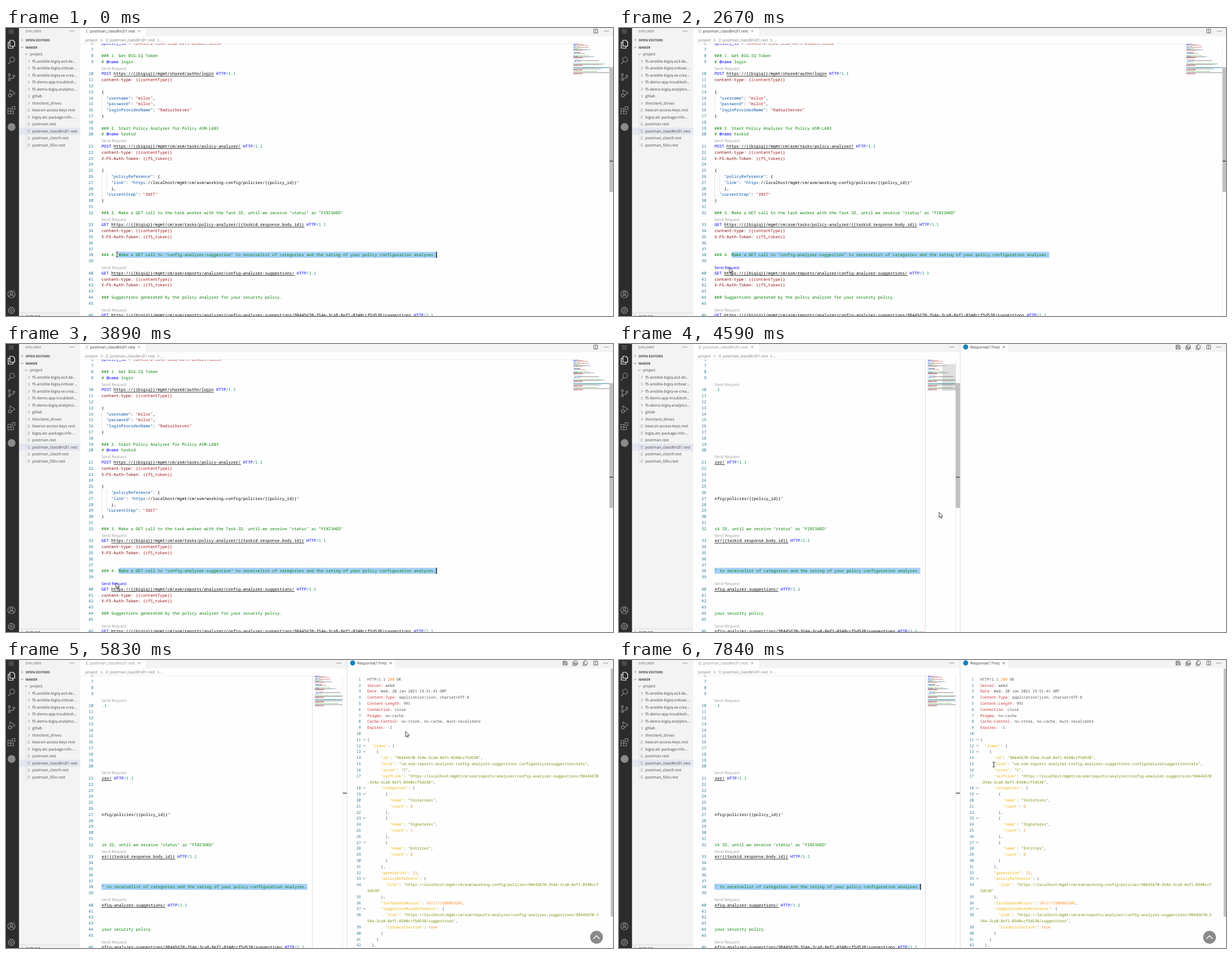
Write an HTML page that moves like this. It is 1087x515 px and loops after 8 s.

```html
<!DOCTYPE html>
<html lang="en">
<head>
<meta charset="utf-8">
<title>REST editor</title>
<style>
  html, body { margin: 0; width: 100%; height: 100%; overflow: hidden; background: #fefefe; }
  svg { display: block; width: 1087px; height: 515px; }
  text { white-space: pre; text-rendering: geometricPrecision; }
  .ui { font-family: "Open Sans", "Noto Sans", sans-serif; font-size: 6.87px; }
  .mono { font-family: "Noto Sans Mono", "DejaVu Sans Mono", monospace; font-size: 7.294px; }
  .small { font-size: 6.78px; }
</style>
</head>
<body>
<svg id="stage" viewBox="0 0 1087 515"></svg>
<script>
const LOOP = 8000, SPLIT = 3950, RESPONSE = 5830;
const LEFT = 171, TOP = 27.7, ROW = 10.8, ADV = 4.376, SCROLL = 231;
const RESP_ADV = 4.068, WRAP = 102;
const INK = '#000', BLUE = '#0000ff', GREEN = '#008000', RED = '#a31515', MAROON = '#800000', KEY = '#0451a5', NUM = '#098658';
const ID = '98445670-354e-3ca8-8ef1-0340ccf5d538';
const REPORTS = '/mgmt/cm/asm/reports/analyzer/config-analyzer-suggestions/';
const HEADERS = 'content-type: {{contentType}}\nX-F5-Auth-Token: {{f5_token}}';

const code = `@bigiq = 10.1.1.4
@contentType = application/json
@f5_token = {{login.response.body.token.token}}

# Policy to analyze
@policy_id = ${ID}

### 1. Get BIG-IQ Token
# @name login
POST https://{{bigiq}}/mgmt/shared/authn/login HTTP/1.1
content-type: {{contentType}}

{
  "username": "milor",
  "password": "milor",
  "loginProviderName": "RadiusServer"
}

### 2. Start Policy Analyzer for Policy ASM-LAB3
# @name taskid
POST https://{{bigiq}}/mgmt/cm/asm/tasks/policy-analyzer/ HTTP/1.1
${HEADERS}

{
    "policyReference": {
    "link": "https://localhost/mgmt/cm/asm/working-config/policies/{{policy_id}}"
    },
  "currentStep": "INIT"
}

### 3. Make a GET call to the task worker with the Task ID, until we receive "status" as "FINISHED"
GET https://{{bigiq}}/mgmt/cm/asm/tasks/policy-analyzer/{{taskid.response.body.id}} HTTP/1.1
${HEADERS}


### 4. Make a GET call to "config-analyzer-suggestion" to receivelist of categories and the rating of your policy configuration analyses.

GET https://{{bigiq}}${REPORTS} HTTP/1.1
${HEADERS}

### Suggestions generated by the policy analyzer for your security policy.

GET https://{{bigiq}}${REPORTS}${ID}/suggestions HTTP/1.1
${HEADERS}`.split('\n');

const category = (name, count, end) => `      {
          "name": "${name}",
          "count": ${count}
        }${end}`;
const response = `HTTP/1.1 200 OK
Server: webd
Date: Wed, 20 Jan 2021 19:51:41 GMT
Content-Type: application/json; charset=UTF-8
Content-Length: 991
Connection: close
Pragma: no-cache
Cache-Control: no-store, no-cache, must-revalidate
Expires: -1

{
  "items": [
    {
      "id": "${ID}",
      "kind": "cm:asm:reports:analyzer:config-analyzer-suggestions:configanalyzersuggestionstate",
      "score": "C",
      "selfLink": "https://localhost${REPORTS}${ID}",
      "categories": [
  ${category('Violations', 6, ',')}
  ${category('Signatures', 1, ',')}
  ${category('Entities', 8, '')}
      ],
      "generation": 13,
      "policyReference": {
        "link": "https://localhost/mgmt/cm/asm/working-config/policies/${ID}"
      },
      "lastUpdateMicros": 1611171508063201,
      "suggestionRuleReference": {
        "link": "https://localhost${REPORTS}${ID}/suggestions",
        "isSubcollection": true
      }
    }
  ],`.split('\n');

const esc = s => s.replace(/&/g, '&amp;').replace(/</g, '&lt;');
const rect = (x, y, w, h, fill, more = '') => `<rect x="${x}" y="${y}" width="${w}" height="${h}" fill="${fill}" ${more}/>`;
const path = (d, stroke, width = .8, more = '') => `<path d="${d}" fill="none" stroke="${stroke}" stroke-width="${width}" ${more}/>`;
const label = (x, cy, s, fill = '#444', more = '') => `<text class="ui" x="${x}" y="${cy + 2.4}" fill="${fill}" ${more}>${esc(s)}</text>`;
const mono = (x, cy, body, cls = '', more = '') => `<text class="mono ${cls}" x="${x}" y="${cy + 2.6}" ${more}>${body}</text>`;
const spans = tokens => tokens.map(([s, fill]) => `<tspan fill="${fill}">${esc(s)}</tspan>`).join('');
const chevron = (x, y, down, color = '#666') =>
  path(down ? `M${x - 2.4} ${y - 1.2}l2.4 2.4l2.4-2.4` : `M${x - 1.2} ${y - 2.4}l2.4 2.4l-2.4 2.4`, color);
const listIcon = (x, y) => path(`M${x - 2.5} ${y - 2}h5m-5 2h3.6m-3.6 2h5`, '#9a9a9a', .7);
const dots = (x, y) => [-3, 0, 3].map(d => `<circle cx="${x + d}" cy="${y}" r=".75" fill="#444"/>`).join('');
const cross = (x, y, color = '#444') => path(`M${x - 2} ${y - 2}l4 4m0-4l-4 4`, color);
const splitIcon = (x, y) => path(`M${x - 3.5} ${y - 3.5}h7v7h-7zm3.5 0v7`, '#444');
const group = (id, body, more = '') => `<g id="${id}" ${more}>${body}</g>`;

// Syntax colours: each token is [text, colour, underlined].
function codeTokens(line) {
  let m;
  if (line[0] === '#') return line.split(/(@name)/).map(s => [s, s === '@name' ? BLUE : GREEN]);
  if (m = line.match(/^(GET|POST) (\S+) HTTP(.*)$/))
    return [[m[1], BLUE], [' ', INK], [m[2], INK, true], [' HTTP', BLUE], [m[3], NUM]];
  if (m = line.match(/^(@\w+)( = )(.*)$/)) return [[m[1], BLUE], [m[2], INK], [m[3], RED]];
  if (m = line.match(/^([\w-]+:)(.*)$/)) return [[m[1], MAROON], [m[2], RED]];
  return line.split(/("\w+"(?=:)|https[^"]*|"\w*"?)/).filter(Boolean).map((s, i, all) => {
    const isKey = s[0] === '"' && (all[i + 1] || '')[0] === ':';
    const url = s.startsWith('https');
    return [s, isKey ? KEY : url || s[0] === '"' ? RED : INK, url];
  });
}

function responseTokens(line, i) {
  const text = '#4d4d4c', m = line.match(/^([\w-]+:)(.*)$/);
  if (i === 0) return line.split(/(200)/).map(s => [s, s === '200' ? '#f5871f' : text]);
  if (m) return [[m[1], '#c82829'], [m[2], text]];
  return line.split(/("\w+"(?=:)|https[^"]*|"[^"]*"|"|\b\d+\b|true)/).filter(Boolean).map((s, k, all) => {
    if (s.startsWith('https')) return [s, '#2f78c4'];
    if (s[0] === '"') return [s, (all[k + 1] || '')[0] === ':' ? '#eab000' : '#718c00'];
    return [s, /^(\d+|true)$/.test(s) ? '#f5871f' : text];
  });
}

function wrapTokens(tokens) {
  const rows = [[]];
  let col = 0;
  for (let [s, fill] of tokens) {
    while (col + s.length > WRAP) {
      const cut = WRAP - col;
      rows.at(-1).push([s.slice(0, cut), fill]);
      rows.push([]);
      s = s.slice(cut);
      col = 0;
    }
    rows.at(-1).push([s, fill]);
    col += s.length;
  }
  return rows;
}

function buildCode() {
  let numbers = '', lenses = '', body = '', row = 0;
  for (let n = 6; n <= 46; n++) {
    const line = code[n - 1];
    if (/^(GET|POST)/.test(line)) {
      const id = n === 40 ? 'id="send"' : '';
      lenses += label(LEFT, TOP + ROW * row++ + 1.4, 'Send Request', '#999', `${id} style="font-size:7px"`);
    }
    const cy = TOP + ROW * row++;
    numbers += mono(156.5, cy, n, '', 'fill="#237893" text-anchor="end"');
    const guides = n >= 14 && n <= 16 || n === 29 ? 1 : n >= 26 && n <= 28 ? 2 : 0;
    for (let g = 0; g < guides; g++) body += rect(LEFT + .3 + g * 2 * ADV, cy - ROW / 2, .6, ROW, '#d3d3d3');
    if (n === 38) {
      const x = LEFT + 7 * ADV, len = line.length - 7;
      body += rect(x, cy - 5.5, len * ADV, ROW, '#a8d1fb');
      body += mono(x, cy, line.slice(7).replace(/[^ ]/g, ' ').replace(/ /g, (c, i) => line[i + 7] === ' ' ? '·' : ' '), '', 'fill="#333" opacity=".3"');
      body += rect(770.2, cy - 5.5, 1.4, ROW, '#000', 'id="caret"');
    }
    const tokens = codeTokens(line);
    body += mono(LEFT, cy, spans(tokens));
    let col = 0;
    for (const [s, fill, under] of tokens) {
      if (under) body += rect(LEFT + col * ADV, cy + 4, s.length * ADV, .8, fill);
      col += s.length;
    }
  }
  return `<clipPath id="codeClip"><rect id="codeBox" x="${LEFT}" y="28" width="845" height="487"/></clipPath>
    <clipPath id="gutterClip"><rect x="133" y="28" width="500" height="487"/></clipPath>
    <g clip-path="url(#gutterClip)">${numbers}${lenses}</g>
    <g clip-path="url(#codeClip)">${group('code', body)}</g>`;
}

function minimap(x, width) {
  let out = '';
  code.forEach((line, i) => {
    const y = 28.3 + i * 1.137;
    if (i === 37) out += rect(x, y - .2, width, 1.3, '#7fb8f0');
    let col = 0;
    for (const [s, fill] of codeTokens(line)) {
      for (const m of s.matchAll(/\S+/g)) {
        const from = (col + m.index) * .568;
        const w = Math.min(m[0].length * .568, width - from);
        if (w > 0) out += rect(x + from, y, w, .75, fill, 'opacity=".6"');
      }
      col += s.length;
    }
  });
  return out;
}

function buildSidebar() {
  const names = ['f5-ansible-bigiq-as3-de...', 'f5-ansible-bigiq-onboar...', 'f5-ansible-bigiq-ve-crea...', 'f5-demo-app-troublesh...',
    'f5-demo-bigiq-analytics...', 'gitlab', 'thinclient_drives', 'beacon-access-keys.rest', 'bigiq-atc-package-info-...',
    'postman.rest', 'postman_class8m2l1.rest', 'postman_class9.rest', 'postman_SSlo.rest'];
  const bold = 'style="font-size:6px;font-weight:700"';
  let out = rect(23, 0, 110, 515, '#f3f3f3') + rect(23, 178.2, 110, 12.5, '#e4e6f1') + rect(35.5, 53, .6, 163, '#d4d4d4');
  out += label(35, 5.8, 'EXPLORER', '#666', 'style="font-size:5.8px"') + dots(118, 5.5);
  out += chevron(29, 21.5) + label(35, 21.5, 'OPEN EDITORS', '#444', bold);
  out += chevron(29, 34.5, true) + label(35, 34.5, 'MAKER', '#444', bold);
  out += chevron(36.5, 47, true) + label(43, 47, 'project');
  names.forEach((name, i) => {
    const y = 59.5 + 12.5 * i;
    out += (i < 7 ? chevron(41, y) : listIcon(41, y)) + label(47, y, name);
  });
  return out + rect(23, 508.8, 110, .7, '#d0d0d0') + chevron(29, 515) + label(35, 515.3, 'OUTLINE', '#444', bold);
}

function buildActivity() {
  const c = '#8a8a8a', w = 1.2;
  return rect(0, 0, 23.3, 515, '#2c2c2c') +
    path('M5 3.5h9M5 6.2h9M5 9h9', c, .9) +
    path('M7 22h5.5l3 3v7.500h-8.500zM7 25.500h-3v10.500h8.500v-3.500', '#fff', w) +
    `<circle cx="11" cy="56.500" r="4.300" fill="none" stroke="${c}" stroke-width="${w}"/>` + path('M8 60l-4.500 5', c, w) +
    [[6, 83.5], [6, 92.5], [14, 86]].map(([x, y]) => `<circle cx="${x}" cy="${y}" r="1.800" fill="none" stroke="${c}" stroke-width="${w}"/>`).join('') +
    path('M6 85.300v5.400M14 88c0 3-5 2-8 3', c, w) +
    path('M7 116v-5.500l9 6l-6 4', c, w) + `<circle cx="7" cy="120.500" r="2.700" fill="none" stroke="${c}" stroke-width="${w}"/>` +
    path('M3.500 143.500h5v10h-5zm0 5h10v5h-10M11 140.500h5v5h-5z', c, w) +
    `<circle cx="10" cy="177" r="7" fill="${c}"/>
     <g fill="none" stroke="${c}" stroke-width="${w}"><circle cx="9.700" cy="476" r="6.500"/><circle cx="9.700" cy="474" r="2.400"/>
     <path d="M5.500 480.500c1-4 7.500-4 8.500 0"/><circle cx="9.700" cy="505" r="4.800"/><circle cx="9.700" cy="505" r="1.800"/>
     <circle cx="9.700" cy="505" r="6" stroke-dasharray="2.400 2.310"/></g>`;
}

function buildSplit() {
  const icon = '#444';
  return rect(250, 0, 361, 14.5, '#f3f3f3') + dots(596, 5.5) + rect(548, 28, .7, 487, '#ccc') + minimap(553, 50) +
    rect(602.6, 28, .6, 487, '#e2e2e2') + rect(603.3, 237.4, 7.4, 1.4, '#333') +
    group('slider', rect(579, 36, 24, 48, '#777', 'opacity=".22"')) +
    group('bars', rect(603, 70, 8, 223, '#646464', 'opacity=".4"') + rect(314, 514, 233, 1, '#646464', 'opacity=".4"')) +
    rect(610.6, 0, .8, 515, '#d4d4d4') + rect(697, 0, 390, 14.5, '#f3f3f3') +
    '<circle cx="620.800" cy="5.300" r="4.600" fill="#1584b8"/>' + label(629, 5.8, 'Response(17ms)', '#333') + cross(689, 5.5) +
    path('M997.500 2h6l1.500 1.500v5.500h-7.500zM999 2v2.500h4v-2.500M999 9v-3h4.500v3', icon) +
    path('M1017 2h5l1.500 1.500v4.500h-6.500zM1017 4h-2v6h6v-2M1018.500 8v-2.500h3.500v2.500', icon) +
    path('M1035.500 1.500h3.500l2 2v4.500h-5.500zM1035.500 4h-2v6h5v-2', icon) + splitIcon(1056, 5.5) + dots(1074, 5.5);
}

function buildResponse() {
  let out = '', row = 0;
  response.forEach((line, i) => {
    const first = 34.2 + row * 10.807;
    out += mono(635.5, first, i + 1, 'small', 'fill="#237893" text-anchor="end"');
    if (/[{[]$/.test(line)) out += chevron(642, first, true);
    for (const tokens of wrapTokens(responseTokens(line, i)))
      out += mono(647, 34.2 + row++ * 10.807, spans(tokens), 'small');
  });
  return out + rect(1082.8, 15, 4.2, 444, '#c1c1c1') +
    '<circle cx="1057.500" cy="495.800" r="11.500" fill="#8a8a8a"/>' + path('M1052 498.500l5.500-5.500l5.500 5.500', '#fff', 1.5);
}

const stage = document.getElementById('stage');
stage.innerHTML = rect(0, 0, 1087, 515, '#fefefe') + buildCode() +
  rect(133, 27.6, 883, .7, '#e4e4e4', 'id="shade"') + listIcon(145, 5.8) +
  label(150.5, 5.8, 'postman_class8m2l1.rest', '#333', 'id="tab"') +
  label(142, 21.8, 'project', '#777') + chevron(171, 21.8) + listIcon(181, 21.8) +
  label(186, 21.8, 'postman_class8m2l1.rest', '#777') + chevron(272.5, 21.8) + label(276.5, 21.8, '...', '#777') +
  group('single', rect(250, 0, 837, 14.5, '#f3f3f3') + splitIcon(1056, 5.5) + dots(1075, 5.5) + minimap(1016, 65) +
    rect(1080.3, 28, .6, 487, '#e2e2e2') + rect(1080.6, 70, 6.4, 223, '#c1c1c1') + rect(1081, 237.4, 6, 1.4, '#333')) +
  group('split', buildSplit()) + group('response', buildResponse()) + cross(238.5, 5.5, '#777') +
  buildSidebar() + buildActivity() +
  group('click', '<circle cx="197" cy="427" r="6.800" fill="#ff0" opacity=".47"/>') +
  group('arrow', '<path d="M0 0v9.500l2.200-2l1.500 3.400l1.500-.7l-1.500-3.200h3z" fill="#fff" stroke="#111" stroke-width=".8"/>') +
  group('beam', path('M-2-4.500q2 0 2 1v7q0 1-2 1M2-4.500q-2 0-2 1m0 7q0 1 2 1', '#111', 1));

const el = {};
for (const node of stage.querySelectorAll('[id]')) el[node.id] = node;
const show = (node, on) => node.setAttribute('visibility', on ? 'visible' : 'hidden');

// Pointer stops: time, x, y.
const pointer = [[0, 199, 405], [600, 199, 405], [1330, 217, 407], [1520, 217, 407], [2030, 198, 429], [2640, 198, 429],
  [2740, 197, 427], [4300, 197, 427], [4590, 573, 301], [4680, 592, 292], [4780, 592, 292], [5060, 717, 232], [5240, 717, 232],
  [5680, 725, 133], [6080, 700, 119], [6280, 700, 119], [6530, 684, 135], [7080, 671, 177], [7140, 671, 177], [7450, 671, 187], [LOOP, 671, 187]];

function pointerAt(t) {
  const i = pointer.findIndex(p => p[0] > t);
  const [t0, x0, y0] = pointer[i - 1], [t1, x1, y1] = pointer[i];
  const k = (t - t0) / (t1 - t0);
  return [x0 + (x1 - x0) * k, y0 + (y1 - y0) * k];
}

function caretOn(t) {
  if (t < SPLIT) return Math.floor((t - 160) / 505) % 2 !== 0;
  return Math.floor((t - 4340) / 499) % 2 !== 0;
}

function render(t) {
  const split = t >= SPLIT;
  show(el.single, !split);
  show(el.split, split);
  show(el.response, t >= RESPONSE);
  show(el.caret, caretOn(t));
  show(el.click, t >= 3360 && t < 3510);
  el.code.setAttribute('transform', `translate(${split ? -SCROLL : 0} 0)`);
  el.codeBox.setAttribute('width', split ? 376 : 845);
  el.shade.setAttribute('width', split ? 415 : 883);
  el.tab.setAttribute('fill', split ? '#8a8a8a' : '#333');
  el.send.setAttribute('fill', t >= 1900 && t < 4360 ? BLUE : '#999');

  const fade = Math.max(0, Math.min(1, (5660 - t) / 370));
  el.bars.setAttribute('opacity', fade);
  el.slider.setAttribute('opacity', t < 4500 ? 0 : fade);

  const [x, y] = pointerAt(t);
  const beam = t < 1850 || t >= 6800;
  show(el.beam, beam);
  show(el.arrow, !beam);
  (beam ? el.beam : el.arrow).setAttribute('transform', `translate(${x} ${y})`);
}

const start = performance.now();
function tick() {
  render((performance.now() - start) % LOOP);
  requestAnimationFrame(tick);
}
tick();
</script>
</body>
</html>
```
